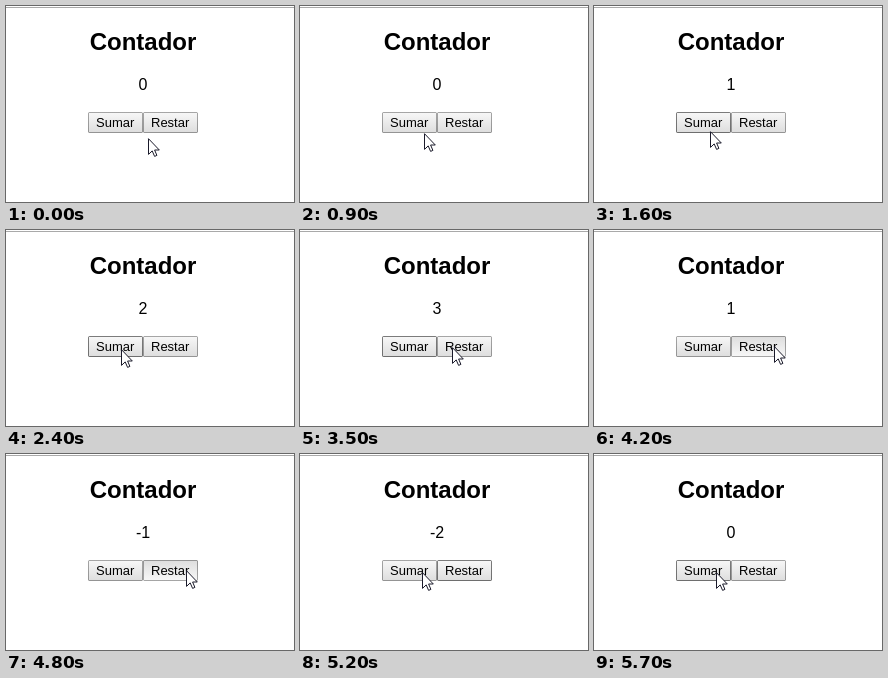
Write an HTML page that moves like this. It is 288x196 px and loops after 6.1 s.

```html
<!DOCTYPE html>
<html lang="es">
<head>
<meta charset="utf-8">
<title>Contador</title>
<style>
  html, body { margin: 0; width: 100%; height: 100%; overflow: hidden; background: #fff; }
  svg { display: block; }
  text { font: 16px "Liberation Sans", Arial, sans-serif; fill: #000; }
  .title { font-size: 24px; font-weight: bold; }
  .mid { text-anchor: middle; }
  .button text { font-size: 13px; }
  .face { fill: url(#raised); }
  .edge { fill: none; stroke: #000; stroke-opacity: .333; }
  .hover .edge { stroke-opacity: .5; }
  .pressed .face { fill: url(#sunken); }
  .pressed .edge { stroke-opacity: .333; }
</style>
</head>
<body>
<svg width="288" height="196" viewBox="0 0 288 196">
  <defs>
    <linearGradient id="raised" x2="0" y2="1">
      <stop stop-color="#f8f8f8"/><stop offset="1" stop-color="#ddd"/>
    </linearGradient>
    <linearGradient id="sunken" x2="0" y2="1">
      <stop stop-color="#ddd"/><stop offset="1" stop-color="#f8f8f8"/>
    </linearGradient>
  </defs>
  <rect y="1" width="288" height="1" fill="#a9a9a9"/>
  <text class="title mid" x="137" y="44">Contador</text>
  <text class="mid" id="count" x="137" y="84">0</text>
  <g class="button" id="add" transform="translate(82 106)">
    <rect class="face" width="55" height="21" rx="1"/>
    <rect class="edge" x=".5" y=".5" width="54" height="20" rx="1"/>
    <text x="8" y="15">Sumar</text>
  </g>
  <g class="button" id="subtract" transform="translate(137 106)">
    <rect class="face" width="55" height="21" rx="1"/>
    <rect class="edge" x=".5" y=".5" width="54" height="20" rx="1"/>
    <text x="8" y="15">Restar</text>
  </g>
  <path id="cursor" d="M.5 .7V16.4L4.2 12.9L6.6 18.4L8.9 17.4L6.6 12H11.3Z"
        fill="#fff" stroke="#1a1a2a" stroke-linejoin="round"/>
</svg>
<script>
const LOOP = 6100;
const STEP = 100; // the picture advances in steps of this many ms

const home = { x: 142, y: 132 };
const glides = [
  { end: 200, time: 200, x: 141, y: 134 },
  { end: 700, time: 400, x: 104, y: 178 },
  { end: 900, time: 200, x: 124, y: 127 },
  { end: 1100, time: 200, x: 118, y: 182 },
  { end: 1400, time: 300, x: 116, y: 125 },
  { end: 2200, time: 200, x: 115, y: 119 },
  { end: 3600, time: 200, x: 180, y: 116 },
  { end: 5200, time: 300, x: 122, y: 118 }
];

const byId = id => document.getElementById(id);
const cursor = byId('cursor');
const count = byId('count');
const buttons = [
  { el: byId('add'), left: 82, delta: 1, releases: [1600, 2400, 3100, 5500, 5700] },
  { el: byId('subtract'), left: 137, delta: -1, releases: [3800, 4000, 4300, 4700, 4900] }
];

const mix = (a, b, k) => Math.round(a + (b - a) * k);

function pointerAt(t) {
  return glides.reduce((from, { end, time, x, y }) => {
    const progress = Math.min(1, Math.max(0, 1 - (end - t) / time));
    const eased = progress ** 0.8;
    return { x: mix(from.x, x, eased), y: mix(from.y, y, eased) };
  }, home);
}

function render(t) {
  const { x, y } = pointerAt(t);
  cursor.setAttribute('transform', `translate(${x} ${y})`);

  // hover follows the pointer one step late
  const felt = pointerAt(t - STEP);
  let total = 0;
  for (const { el, left, delta, releases } of buttons) {
    const over = felt.x >= left && felt.x < left + 55 && felt.y >= 106 && felt.y < 127;
    el.classList.toggle('hover', over);
    el.classList.toggle('pressed', releases.includes(t + STEP));
    total += delta * releases.filter(at => at <= t).length;
  }
  count.textContent = total;
}

const start = performance.now();
function tick() {
  const t = (performance.now() - start) % LOOP;
  render(Math.floor(t / STEP) * STEP);
  requestAnimationFrame(tick);
}
tick();
</script>
</body>
</html>
```
